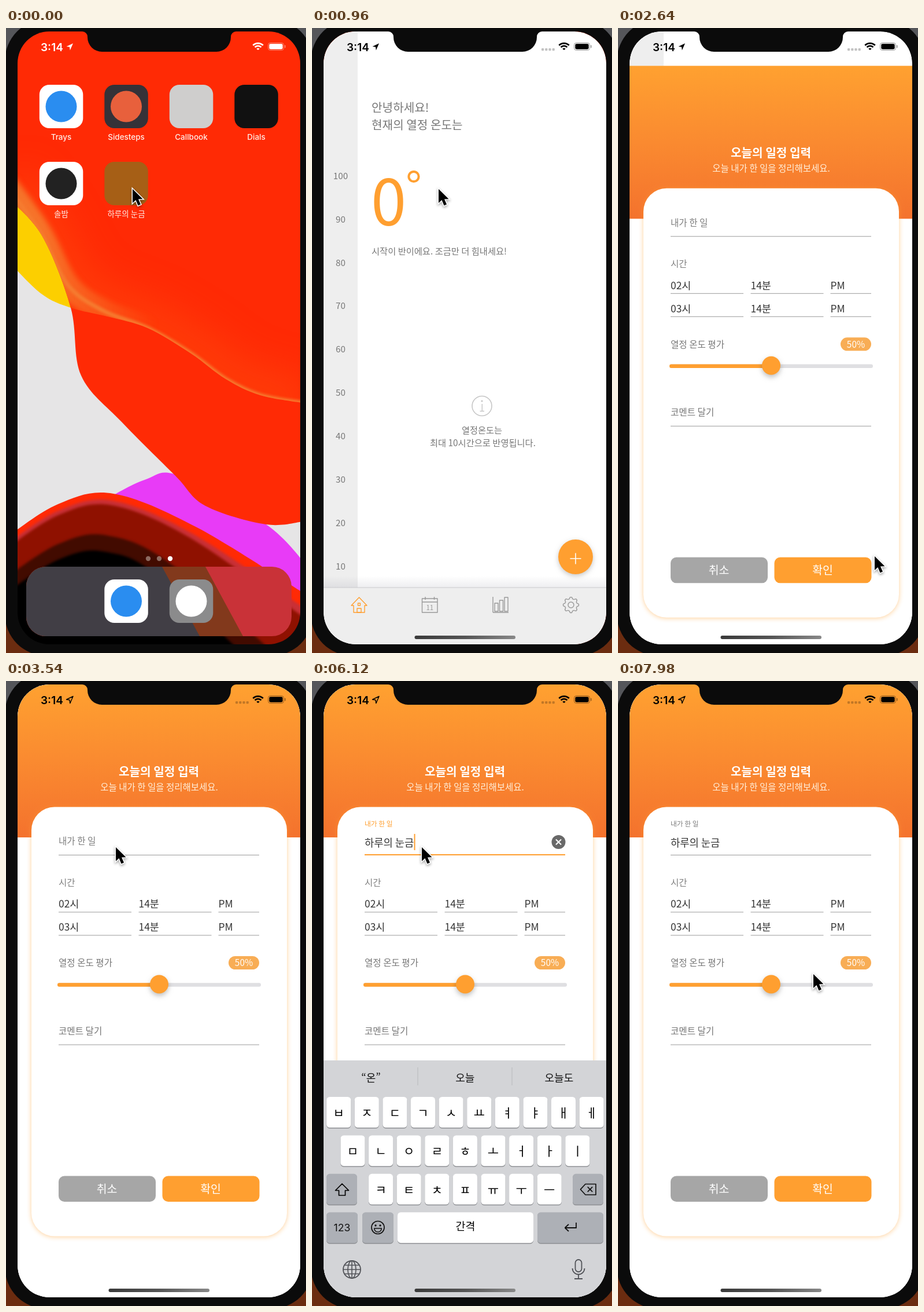
An HTML page with a canvas for the animation above (8000 ms loop, 519 px wide and 1079 px high).

```html
<!DOCTYPE html>
<html lang="ko">
<head>
<meta charset="utf-8">
<title>Phone demo</title>
<style>
html, body { margin: 0; width: 100%; height: 100%; overflow: hidden; background: #0b0b0b; }
canvas { display: block; width: 519px; height: 1079px; }
</style>
</head>
<body>
<canvas id="stage"></canvas>
<script>
const W = 519, H = 1079, LOOP = 8000;
const SX = 20, SY = 6, SW = 489, SH = 1058;
const KR = '"Noto Sans CJK KR", "Noto Sans CJK", "Noto Sans", sans-serif';
const UI = 'Inter, Roboto, sans-serif';
const ORANGE = '#ff9f30', GREY = '#777', BEZEL = '#0b0b0b';
const NAME = '하루의 눈금';

// moments in ms
const LAUNCH = 60, MODAL = 2334, FOCUS = 3607, HANGUL = 4380, TYPE = 4700, KEY_MS = 108, HINTS = 5740, DISMISS = 6840;

const dpr = window.devicePixelRatio || 1;
const canvas = document.getElementById('stage');
let g = canvas.getContext('2d');
canvas.width = W * dpr;
canvas.height = H * dpr;

const clamp = v => Math.max(0, Math.min(1, v));
const lerp = (a, b, p) => a + (b - a) * p;
const ease = p => (p = clamp(p), p * p * (3 - 2 * p));
const spring = (ms, w = 15) => {
  const x = Math.max(0, w * ms / 1000);
  return 1 - (1 + x) * Math.exp(-x);
};

function group(fn) { g.save(); fn(); g.restore(); }
function paint(fill, width, stroke) {
  if (fill) { g.fillStyle = fill; g.fill(); }
  if (width) { g.lineWidth = width; g.strokeStyle = stroke; g.stroke(); }
}
function box(x, y, w, h, r, ...style) {
  g.beginPath();
  g.roundRect(x, y, w, h, r);
  paint(...style);
}
function disc(x, y, r, ...style) {
  g.beginPath();
  g.arc(x, y, r, 0, 7);
  paint(...style);
}
const ring = (x, y, r, width, color) => disc(x, y, r, null, width, color);
function poly(points, ...style) {
  g.beginPath();
  points.forEach(p => g.lineTo(...p));
  g.closePath();
  paint(...style);
}
function line(x1, y1, x2, y2, width, color) {
  g.beginPath();
  g.moveTo(x1, y1);
  g.lineTo(x2, y2);
  paint(null, width, color);
}
function plus(x, y, r, width, color, turn = 0) {
  const c = r * Math.cos(turn), s = r * Math.sin(turn);
  line(x - c, y - s, x + c, y + s, width, color);
  line(x + s, y - c, x - s, y + c, width, color);
}
// y is the optical middle of the line
function text(s, x, y, size, color, align = 'left', font = KR, weight = 400) {
  g.font = `${weight} ${size}px ${font}`;
  g.textAlign = align;
  g.fillStyle = color;
  g.fillText(s, x, y + size * 0.37);
}
function shaded(color, blur, y, fn) {
  group(() => {
    g.shadowColor = color;
    g.shadowBlur = blur * dpr;
    g.shadowOffsetY = y * dpr;
    fn();
  });
}
function blend(x1, y1, x2, y2, ...colors) {
  const grad = g.createLinearGradient(x1, y1, x2, y2);
  colors.forEach((c, i) => grad.addColorStop(i / (colors.length - 1), c));
  return grad;
}

// smooth curve through a few points
function curve(p) {
  g.beginPath();
  g.moveTo(...p[0]);
  for (let i = 0; i < p.length - 1; i++) {
    const a = p[i - 1] || p[i], b = p[i], c = p[i + 1], d = p[i + 2] || c;
    g.bezierCurveTo(b[0] + (c[0] - a[0]) / 6, b[1] + (c[1] - a[1]) / 6,
      c[0] - (d[0] - b[0]) / 6, c[1] - (d[1] - b[1]) / 6, ...c);
  }
}
// fills from the curve up or down to the edge of the stage
function area(points, edge, fill) {
  curve(points);
  g.lineTo(W, edge);
  g.lineTo(0, edge);
  paint(fill);
}
const blur = px => { g.filter = px ? `blur(${px * dpr}px)` : 'none'; };

function paintWall() {
  const tail = [[245, 518], [320, 562], [380, 606], [440, 634], [W, 648]];
  const ridge = [[0, 398], [60, 458], [112, 483], [175, 498], ...tail];
  const lobe = [[0, 290], [62, 358], [112, 483], [130, 600], [200, 680], [293, 773], [345, 825], [450, 857], [W, 851]];
  const glow = [[0, 270], [60, 355], [108, 445], [170, 489], ...tail];
  g.fillStyle = '#e6e5e6';
  g.fillRect(0, 0, W, H);
  area([[170, 815], [240, 780], [300, 773], [450, 857], [W, 926]], H, '#e83bf7');
  area(ridge, 0, '#fccf00');
  area(lobe, 0, '#ff2a05');
  group(() => {
    area(ridge, 0);
    g.clip();
    area(lobe, 0);
    g.clip();
    const streak = (soft, width, color) => {
      blur(soft);
      curve(glow);
      paint(null, width, color);
    };
    streak(30, 100, 'rgba(255,74,12,.5)');
    streak(5, 40, blend(60, 0, 260, 0, 'rgba(245,122,46,.9)', 'rgba(245,122,46,0)'));
    streak(2, 7, '#f57c30');
  });
  // one hill, sunk deeper and narrower for each darker layer
  const hill = (s, color) => area([[0, 880 + 95 * s], [90, 822 + 96 * s], [186 - 16 * s, 804 + 100 * s],
    [330 - 55 * s, 862 + 93 * s], [W, 978 + 210 * s]], H, color);
  hill(0, '#ff2a05');
  g.clip();
  blur(2);
  hill(.12, '#c93036');
  hill(.2, '#8f1100');
  hill(.72, '#420b00');
  hill(1, '#000');
}
const wall = document.createElement('canvas');
wall.width = canvas.width;
wall.height = canvas.height;
{
  const main = g;
  g = wall.getContext('2d');
  g.scale(dpr, dpr);
  paintWall();
  g = main;
}

function status(color, dots, outlined) {
  text('3:14', 60, 33, 19, color, 'left', UI, 600);
  g.lineJoin = 'round';
  poly([[116, 26.5], [104.5, 32], [110, 32.8], [110.8, 38.5]], outlined ? null : color, outlined && 1.4, color);
  if (dots) for (let i = 0; i < 4; i++) box(397 + i * 6.2, 35, 4.2, 4.2, 1.2, 'rgba(0,0,0,.24)');
  for (const r of [12.2, 7.6, 2.4]) {
    g.beginPath();
    g.arc(436, 38.5, r, -2.36, -0.78);
    paint(null, 2.8, color);
  }
  group(() => {
    g.globalAlpha *= 0.4;
    box(453.5, 25.5, 27, 13, 4, null, 1, color);
    box(482, 29.5, 1.6, 5, 1, color);
  });
  box(455.3, 27.3, 23.4, 9.4, 2.4, color);
}

const column = i => 95.5 + i * 112.5;
function appIcon(col, y, label, tile, mark) {
  const x = column(col);
  box(x - 37.7, y, 75.5, 75, 17, tile);
  if (mark) disc(x, y + 37.5, 27, mark);
  text(label, x, y + 90, 13.5, '#ffeee8', 'center', /[a-z]/.test(label) ? UI : KR, 500);
}

function home(t) {
  const p = spring(t - LAUNCH), fade = 1 - clamp((t - LAUNCH) / 180);
  group(() => {
    g.translate(W / 2, H / 2);
    g.scale(1 + 0.05 * p, 1 + 0.05 * p);
    if (p > 0.01) blur(16 * p);
    g.drawImage(wall, -W / 2, -H / 2, W, H);
  });
  g.fillStyle = `rgba(0,0,0,${0.44 * p})`;
  g.fillRect(0, 0, W, H);
  if (!fade) return;
  group(() => {
    g.globalAlpha = fade;
    box(35, 930, 459, 120, 34, '#c93238');
    group(() => {
      g.clip();
      poly([[35, 930], [345, 930], [410, 1050], [35, 1050]], '#82391c');
      poly([[35, 930], [270, 930], [335, 1050], [35, 1050]], '#413e45');
    });
    for (let i = 0; i < 3; i++) disc(246 + i * 19, 916, 4.2, i < 2 ? 'rgba(190,170,160,.6)' : '#fff');
    appIcon(0, 98, 'Trays', '#fff', '#2a8df0');
    appIcon(1, 98, 'Sidesteps', '#353238', '#e8603c');
    appIcon(2, 98, 'Callbook', '#cfcecd');
    appIcon(3, 98, 'Dials', '#111');
    appIcon(0, 231, '솔밤', '#fff', '#222');
    appIcon(1, 231, NAME, '#a65f16');
    appIcon(1, 952, '', '#fff', '#2a8df0');
    appIcon(2, 952, '', '#8b8b8c', '#fff');
    status('#fff');
  });
}

function tabIcons() {
  const c = '#999', w = 1.4;
  g.lineJoin = 'round';
  poly([[68, 997], [81.5, 983], [95, 997], [91, 997], [91, 1009], [72, 1009], [72, 997]], null, w, ORANGE);
  box(79.5, 993, 4, 4, 0, null, w, ORANGE);
  box(78, 1002, 7, 7, 0, null, w, ORANGE);

  box(190.5, 985, 26.5, 24, 0, null, w, c);
  line(190.5, 991, 217, 991, w, c);
  for (const x of [196, 211.5]) line(x, 982, x, 987, w, c);
  text('11', 203.8, 1000.5, 11.5, c, 'center');

  line(313, 982, 313, 1009, w, c);
  line(313, 1009, 340, 1009, w, c);
  for (let i = 0; i < 3; i++) box(316 + i * 8.5, 993 - i * 5, 6, 14 + i * 5, 0, null, w, c);

  const gear = Array.from({ length: 32 }, (_, i) => {
    const a = (i - 0.5) * Math.PI / 16, r = i % 4 < 2 ? 13.5 : 10.6;
    return [448 + r * Math.cos(a), 996 + r * Math.sin(a)];
  });
  poly(gear, null, w, c);
  ring(448, 996, 5, w, c);
}

function mainScreen() {
  g.fillStyle = '#fff';
  g.fillRect(SX, SY, SW, SH);
  g.fillStyle = '#eee';
  g.fillRect(SX, SY, 59, 960);
  for (let i = 0; i < 10; i++) text(100 - i * 10, 49.5, 255 + i * 74.95, 15.2, GREY, 'center');
  text('안녕하세요!', 103, 138, 20.2, GREY);
  text('현재의 열정 온도는', 103, 168, 20.2, GREY);
  text('0', 132.5, 300, 110, ORANGE, 'center');
  ring(176, 256.5, 8.6, 4, ORANGE);
  text('시작이 반이에요. 조금만 더 힘내세요!', 103, 385, 15.3, GREY);
  const c = '#c6c6c6';
  ring(294, 652.5, 17, 1.6, c);
  disc(294, 644, 1.6, c);
  line(294.3, 649, 294.3, 661.5, 1.4, c);
  line(290.5, 661.5, 298, 661.5, 1.4, c);
  text('열정온도는', 294, 694, 15.2, GREY, 'center');
  text('최대 10시간으로 반영됩니다.', 295.5, 716.5, 15.3, GREY, 'center');
  g.fillStyle = blend(0, 946, 0, 966, 'rgba(120,120,140,0)', 'rgba(120,120,140,.13)');
  g.fillRect(SX, 946, SW, 20);
  shaded('rgba(0,0,0,.22)', 9, 3, () => disc(456, 913, 30, ORANGE));
  plus(456, 916, 9.5, 1.6, '#fff');
  g.fillStyle = '#eee';
  g.fillRect(SX, 966, SW, 98);
  line(SX, 966, SX + SW, 966, 1, '#c9c9cc');
  tabIcons();
}

// every state of the text while its Hangul letters are composed
function keystrokes(s) {
  const initials = 'ㄱㄲㄴㄷㄸㄹㅁㅂㅃㅅㅆㅇㅈㅉㅊㅋㅌㅍㅎ', base = 0xac00, out = [];
  let done = '';
  for (const ch of s) {
    const n = ch.charCodeAt(0) - base;
    if (n >= 0) out.push(done + initials[Math.floor(n / 588)]);
    if (n >= 0 && n % 28) out.push(done + String.fromCharCode(base + n - n % 28));
    out.push(done += ch);
  }
  return out;
}
const TYPED = ['', ...keystrokes(NAME)];

function nameField(t) {
  const up = ease((t - FOCUS) / 200), focus = up * (1 - ease((t - DISMISS) / 200));
  const label = [255, 159, 48].map(v => lerp(125, v, focus));
  text('내가 한 일', 91, lerp(276.5, 247, up), lerp(15.6, 11.8, up), `rgb(${label})`);
  rule(91, 438, 300.5);
  group(() => {
    g.globalAlpha = focus;
    line(91, 300, 438, 300, 2.2, ORANGE);
  });
  const last = TYPED.length - 1, n = Math.floor((t - TYPE) / KEY_MS) + 1;
  const value = TYPED[Math.max(0, Math.min(last, n))];
  text(value, 91, 279, 17.7, '#333');
  if (t < FOCUS || t >= DISMISS) return;
  const x = 92.2 + g.measureText(value).width;
  const idle = t - (n < 1 ? FOCUS : TYPE + KEY_MS * last);
  if (idle < 0 || idle % 1060 < 560) line(x, 264, x, 292, 2, ORANGE);
  if (value) {
    disc(426.5, 278, 12, '#696969');
    plus(426.5, 278, 6.4, 2, '#fff', Math.PI / 4);
  }
}

const rule = (x1, x2, y) => line(x1, y, x2, y, 1, '#9a9a9a');

function form(t) {
  g.fillStyle = '#fff';
  g.fillRect(SX, SY, SW, SH + 20);
  g.fillStyle = blend(0, SY, 0, 270, '#ffa130', '#fa8a30', '#f4722d');
  g.fillRect(SX, SY, SW, 264);
  text('오늘의 일정 입력', 264.5, 156.5, 20.2, '#fff', 'center', KR, 700);
  text('오늘 내가 한 일을 정리해보세요.', 265, 183, 15.5, '#fff0dc', 'center');
  shaded('rgba(255,159,48,.5)', 9, 1, () => box(44, 217.5, 442, 741, 40, '#fff'));
  nameField(t);

  text('시간', 91, 348, 15.5, '#808080');
  ['02시', '03시'].forEach((hour, i) => {
    const y = 385 + i * 40;
    const cell = (s, x, w) => { text(s, x, y, 17.4, '#333'); rule(x, x + w, y + 14); };
    cell(hour, 91, 126);
    cell('14분', 229.5, 126);
    cell('PM', 367.5, 70.5);
  });
  text('열정 온도 평가', 91, 486.5, 15.6, GREY);
  box(385, 475, 53, 23, 11.5, '#f8ad55');
  text('50%', 411.5, 486.5, 15.4, '#fff', 'center');
  box(89, 521.2, 352, 6.6, 3.3, '#dfdfe2');
  box(89, 521.2, 176, 6.6, 3.3, ORANGE);
  shaded('rgba(0,0,0,.25)', 8, 4, () => disc(265, 523.5, 16, ORANGE));
  text('코멘트 달기', 91, 604, 15.6, GREY);
  rule(91, 438, 628);
  const button = (s, x, color) => {
    box(x, 854.5, 168, 44.5, 10, color);
    text(s, x + 83.5, 877, 19.4, '#fff', 'center');
  };
  button('취소', 91, '#a6a6a6');
  button('확인', 270.5, ORANGE);
}

function keyboard(t) {
  const kr = t >= HANGUL, font = kr ? KR : UI, dark = '#111', special = '#adb0b6';
  const rowY = r => 718 + r * 66.4;
  const key = (x, r, w, fill = special) => {
    box(x, rowY(r) + 1, w, 53.5, 5.5, '#8d8f93');
    box(x, rowY(r), w, 53, 5.5, fill);
  };
  g.fillStyle = '#d3d4d7';
  g.fillRect(SX, 655, SW, 424);
  for (const x of [183, 346]) line(x, 667, x, 698, 1, '#b8b9bc');
  if (t >= HINTS) ['“온”', '오늘', '오늘도'].forEach((s, i) => text(s, 102 + i * 162.7, 685, 18, dark, 'center'));

  const rows = kr ? ['ㅂㅈㄷㄱㅅㅛㅕㅑㅐㅔ', 'ㅁㄴㅇㄹㅎㅗㅓㅏㅣ', 'ㅋㅌㅊㅍㅠㅜㅡ'] : ['QWERTYUIOP', 'ASDFGHJKL', 'ZXCVBNM'];
  rows.forEach((row, r) => [...row].forEach((ch, i) => {
    const x = 265 + (i - row.length / 2) * 48.6 + 3.2;
    key(x, r, 42, '#fff');
    text(ch, x + 21, rowY(r) + 27, kr ? 21 : 25, '#000', 'center', font);
  }));

  g.lineJoin = 'round';
  key(25, 2, 53, kr ? special : '#fff');
  poly([[52, 868], [63.5, 879.5], [57.5, 879.5], [57.5, 888], [46.5, 888], [46.5, 879.5], [40.5, 879.5]],
    kr ? null : '#000', 1.7, '#000');
  key(451, 2, 53);
  poly([[464.5, 877.7], [473, 868.5], [491, 868.5], [491, 887], [473, 887]], null, 1.7, dark);
  plus(481, 877.7, 6, 1.7, dark, Math.PI / 4);

  key(25, 3, 54);
  text('123', 52, 943.5, 17.6, dark, 'center', UI);
  key(87, 3, 54);
  ring(114, 943.5, 11, 1.7, dark);
  for (const x of [110, 118]) disc(x, 940, 1.7, dark);
  g.beginPath();
  g.arc(114, 945, 6.3, 0, Math.PI);
  g.closePath();
  paint(null, 1.5, dark);
  key(148, 3, 235, '#fff');
  text(kr ? '간격' : 'space', 265.5, 941.5, 18.4, '#000', 'center', font);
  key(390, 3, 114);
  if (kr) {
    line(438, 944, 457, 944, 1.8, dark);
    line(457, 935, 457, 944.9, 1.8, dark);
    for (const d of [-6, 6]) line(437.5, 944, 444, 944 + d, 1.8, dark);
  } else text('return', 447, 941.5, 18.2, dark, 'center', UI);

  const c = '#505257';
  ring(69, 1016, 15, 1.8, c);
  plus(69, 1016, 15, 1.6, c);
  g.beginPath();
  g.ellipse(69, 1016, 7, 15, 0, 0, 7);
  paint(null, 1.6, c);
  for (const d of [-7.5, 7.5]) line(56, 1016 + d, 82, 1016 + d, 1.6, c);
  box(455.5, 999, 11, 21, 5.5, null, 1.8, c);
  g.beginPath();
  g.arc(461, 1014, 10.5, Math.PI, 0, true);
  paint(null, 1.8, c);
  line(461, 1024.5, 461, 1032, 1.8, c);
  line(454, 1032, 468, 1032, 1.8, c);
}

function raised(drop, fn) {
  group(() => { g.translate(0, drop); fn(); });
}

function app(t) {
  mainScreen();
  if (t > MODAL) raised(SH * (1 - spring(t - MODAL)), () => form(t));
  const kb = spring(t - FOCUS) - spring(t - DISMISS);
  if (kb > 0.001) raised(424 * (1 - kb), () => keyboard(t));
  status('#000', true, t > 3300);
  box(177.5, 1049, 174.5, 6, 3, blend(178, 0, 352, 0, '#3a3a3a', '#555', '#888'));
}

function splash(t) {
  const a = 1 - clamp((t - 220) / 245);
  if (!a) return;
  group(() => {
    g.globalAlpha = a;
    g.fillStyle = '#fdac30';
    g.fillRect(SX, SY, SW, SH);
    g.fillStyle = 'rgba(255,255,255,.05)';
    g.fillRect(147.5, 418, 234, 236);
    g.globalAlpha = Math.min(1, a * 2.2);
    disc(264.5, 536, 62, '#fff');
  });
}

// app window growing out of its icon
function appWindow(t) {
  const ms = t - LAUNCH;
  if (ms < 0) return;
  const p = spring(ms, 15.7), top = lerp(231, SY, spring(ms, 13)), bottom = lerp(306, SY + SH, spring(ms, 14.8));
  const x = lerp(170, SX, p), w = lerp(75.5, SW, p), k = w / SW;
  group(() => {
    box(x, top, w, bottom - top, lerp(17, 55, p));
    g.clip();
    g.translate(x, top);
    g.scale(k, k);
    g.translate(-SX, -SY);
    app(t);
    splash(t);
  });
}

function notch() {
  g.beginPath();
  g.moveTo(131, 0);
  g.arcTo(131, SY, 141, SY, 0);
  g.arcTo(141, SY, 141, 16, 9);
  g.arcTo(141, 41, 166, 41, 25);
  g.arcTo(389, 41, 389, 16, 25);
  g.arcTo(389, SY, 399, SY, 9);
  g.lineTo(399, SY);
  g.lineTo(399, 0);
  paint(BEZEL);
}

// each move: start, end, then where it leads
const MOVES = [[1150, 2000, 455, 914], [2350, 2600, 443, 911], [2780, 3440, 189, 286], [7250, 7980, 337, 505]];
function pointer(t) {
  let x = 218, y = 277;
  for (const [from, to, nx, ny] of MOVES) {
    const p = ease((t - from) / (to - from));
    x = lerp(x, nx, p);
    y = lerp(y, ny, p);
  }
  group(() => {
    g.translate(x, y);
    g.lineJoin = 'miter';
    const arrow = [[1, 1], [1, 25], [6.5, 20], [10.5, 29.5], [15, 27.5], [11, 18.5], [18.5, 18.2]];
    shaded('rgba(0,0,0,.4)', 4, 2, () => poly(arrow, null, 3, '#fff'));
    poly(arrow, '#000');
  });
}

function desk() {
  g.fillStyle = '#55565a';
  g.fillRect(0, 0, W, H);
  g.fillStyle = '#6b2c10';
  g.fillRect(0, 1030, W, 49);
  box(-2, -15, 533, 1099, 72, BEZEL);
}

function draw(t) {
  g.setTransform(dpr, 0, 0, dpr, 0, 0);
  desk();
  group(() => {
    box(SX, SY, SW, SH, 55);
    g.clip();
    if (t < 1200) home(t);
    appWindow(t);
  });
  notch();
  pointer(t);
}

const begin = performance.now();
function tick() {
  draw((performance.now() - begin) % LOOP);
  requestAnimationFrame(tick);
}
tick();
</script>
</body>
</html>
```
